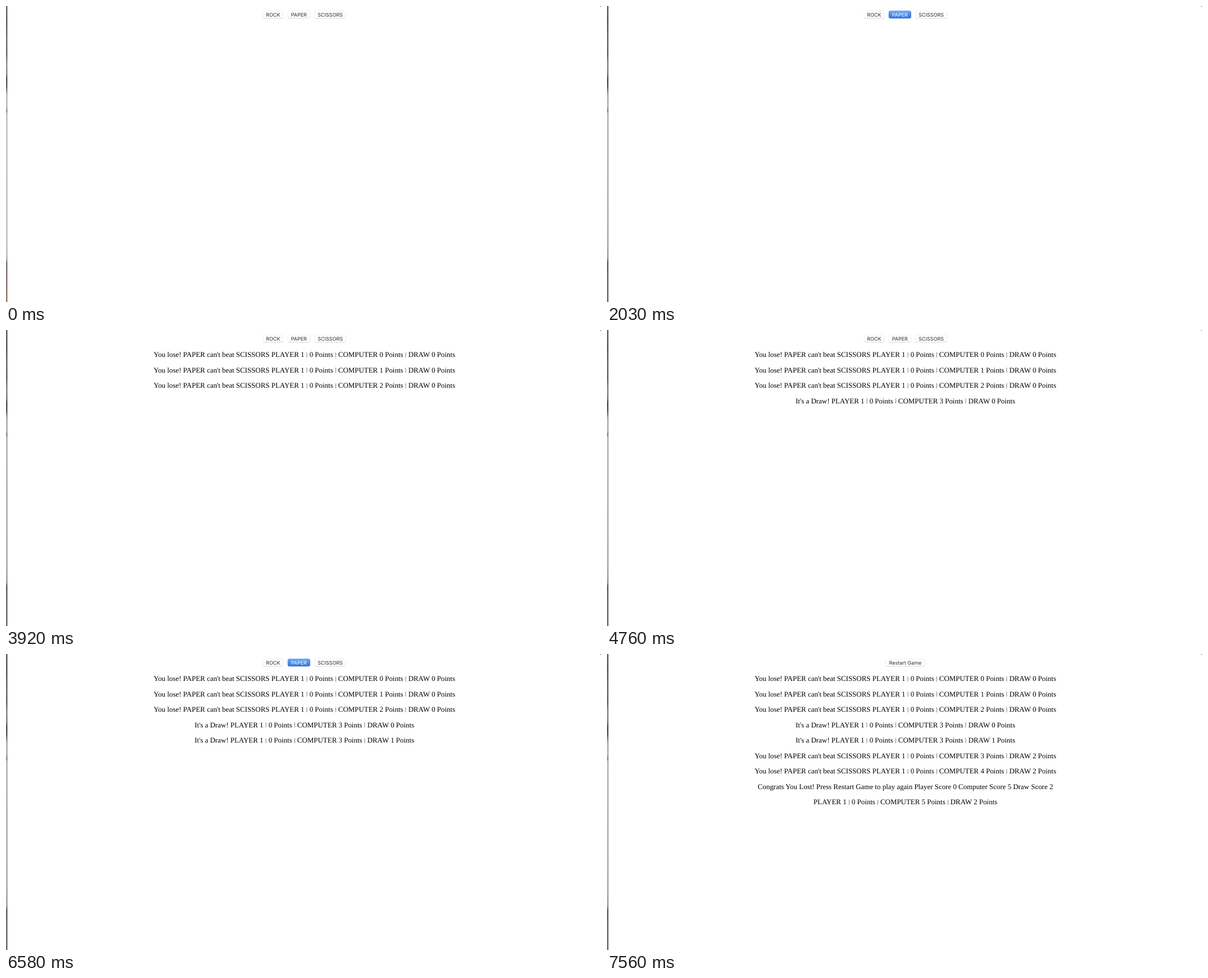
An HTML page for the animation above (8 s loop, 1060 by 528 pixels).

```html
<!DOCTYPE html>
<html lang="en">
<head>
<meta charset="utf-8">
<title>Rock paper scissors</title>
<style>
html, body { margin: 0; width: 100%; height: 100%; overflow: hidden; background: #fff; }
svg { display: block; text-rendering: geometricPrecision; }
text { text-anchor: middle; }
.row { font: 12.95px "Liberation Serif", "Times New Roman", serif; fill: #000; }
.bar { font-size: 10px; }
.label { font: 9px Inter, "Liberation Sans", sans-serif; fill: #2b2b2b; }
.face { fill: #fff; stroke: #e4e4e4; stroke-width: .6; }
.shade { fill: #c6c6c6; }
.down .face { fill: url(#blue); stroke: #4c86dc; }
.down .shade { fill: #3a6fca; }
.down .label { fill: #fff; }
</style>
</head>
<body>
<svg id="stage" width="1060" height="528" viewBox="0 0 1060 528">
  <defs>
    <linearGradient id="blue" x2="0" y2="1">
      <stop stop-color="#6eaaf3"/><stop offset="1" stop-color="#3573dc"/>
    </linearGradient>
  </defs>
</svg>
<script>
const stage = document.getElementById('stage');

function add(parent, tag, attrs, text = '') {
  const el = document.createElementNS('http://www.w3.org/2000/svg', tag);
  for (const key in attrs) el.setAttribute(key, attrs[key]);
  el.textContent = text;
  return parent.appendChild(el);
}

const show = (el, on) => el.setAttribute('visibility', on ? 'visible' : 'hidden');

// Sliver of desktop on the left: [y, colour] stops
function strip(id, stops, edge) {
  const grad = add(stage.querySelector('defs'), 'linearGradient',
    { id, x2: 0, y2: 528, gradientUnits: 'userSpaceOnUse' });
  for (const [y, color] of stops) add(grad, 'stop', { offset: y / 528, 'stop-color': color });
  const g = add(stage, 'g', {});
  add(g, 'rect', { width: 2.4, height: 528, fill: `url(#${id})` });
  add(g, 'rect', { x: 1.6, width: .9, height: 528, fill: edge });
  return g;
}

const upper = [[0, '#686868'], [30, '#5c5c5c'], [62, '#777'], [85, '#686868'], [105, '#a0a0a0'],
  [122, '#8c8c8c'], [130, '#555'], [144, '#606060'], [158, '#c4c4c4'], [180, '#ccc'],
  [187, '#909090'], [192, '#d2d2d2']];
const idle = strip('idle', [...upper, [440, '#d0d0d0'], [452, '#bbb'], [458, '#7c7c7c'],
  [480, '#8a7d77'], [528, '#9a7f73']], '#7778');
const active = strip('active', [...upper, [420, '#c6c4c0'], [450, '#b4b2b0'], [457, '#666'],
  [490, '#777'], [528, '#7d7470']], '#555a');

add(stage, 'path', { d: 'M1058 0h2v2z', fill: '#666' });

function button(x, width, label) {
  const g = add(stage, 'g', {});
  add(g, 'rect', { x, y: 10, width, height: 12.2, rx: 2.6, class: 'shade' });
  add(g, 'rect', { x, y: 8.8, width, height: 12.6, rx: 2.6, class: 'face' });
  add(g, 'text', { x: x + width / 2, y: 18.5, class: 'label' }, label);
  return g;
}

const rock = button(458, 35.6, 'ROCK');
const paper = button(502, 39.6, 'PAPER');
const scissors = button(550, 55.4, 'SCISSORS');
const restart = button(496.4, 70, 'Restart Game');

const score = (computer, draw) =>
  `PLAYER 1 | 0 Points | COMPUTER ${computer} Points | DRAW ${draw} Points`;
const lose = (...s) => "You lose! PAPER can't beat SCISSORS " + score(...s);
const tie = (...s) => "It's a Draw! " + score(...s);

const END = 7560;
const rows = [
  [2170, lose(0, 0)], [3080, lose(1, 0)], [3920, lose(2, 0)],
  [4760, tie(3, 0)], [5810, tie(3, 1)], [6720, lose(3, 2)], [END, lose(4, 2)],
  [END, 'Congrats You Lost! Press Restart Game to play again Player Score 0 Computer Score 5 Draw Score 2'],
  [END, score(5, 2)]
].map(([start, line], i) => {
  const el = add(stage, 'text', { x: 531.6, y: 48.4 + 27.5 * i, class: 'row' });
  // Bars are raised so that they end at the baseline
  line.split('|').forEach((part, k) => {
    if (k) add(el, 'tspan', { class: 'bar', dx: .3, dy: -1.9 }, '|');
    add(el, 'tspan', k ? { dx: .3, dy: 1.9 } : {}, part);
  });
  return { start, el };
});

const presses = [[1260, 1330], [2030, 2170], [2870, 3080], [3780, 3920],
  [4620, 4760], [5670, 5810], [6580, 6720], [7420, END]];

function draw(now) {
  const t = now % 8000;
  show(idle, t < 1190);
  show(active, t >= 1190);
  for (const b of [rock, paper, scissors]) show(b, t < END);
  show(restart, t >= END);
  paper.setAttribute('class', presses.some(([a, b]) => t >= a && t < b) ? 'down' : '');
  for (const { start, el } of rows) show(el, t >= start);
}

const begin = performance.now();
function tick() {
  draw(performance.now() - begin);
  requestAnimationFrame(tick);
}
tick();
</script>
</body>
</html>
```
